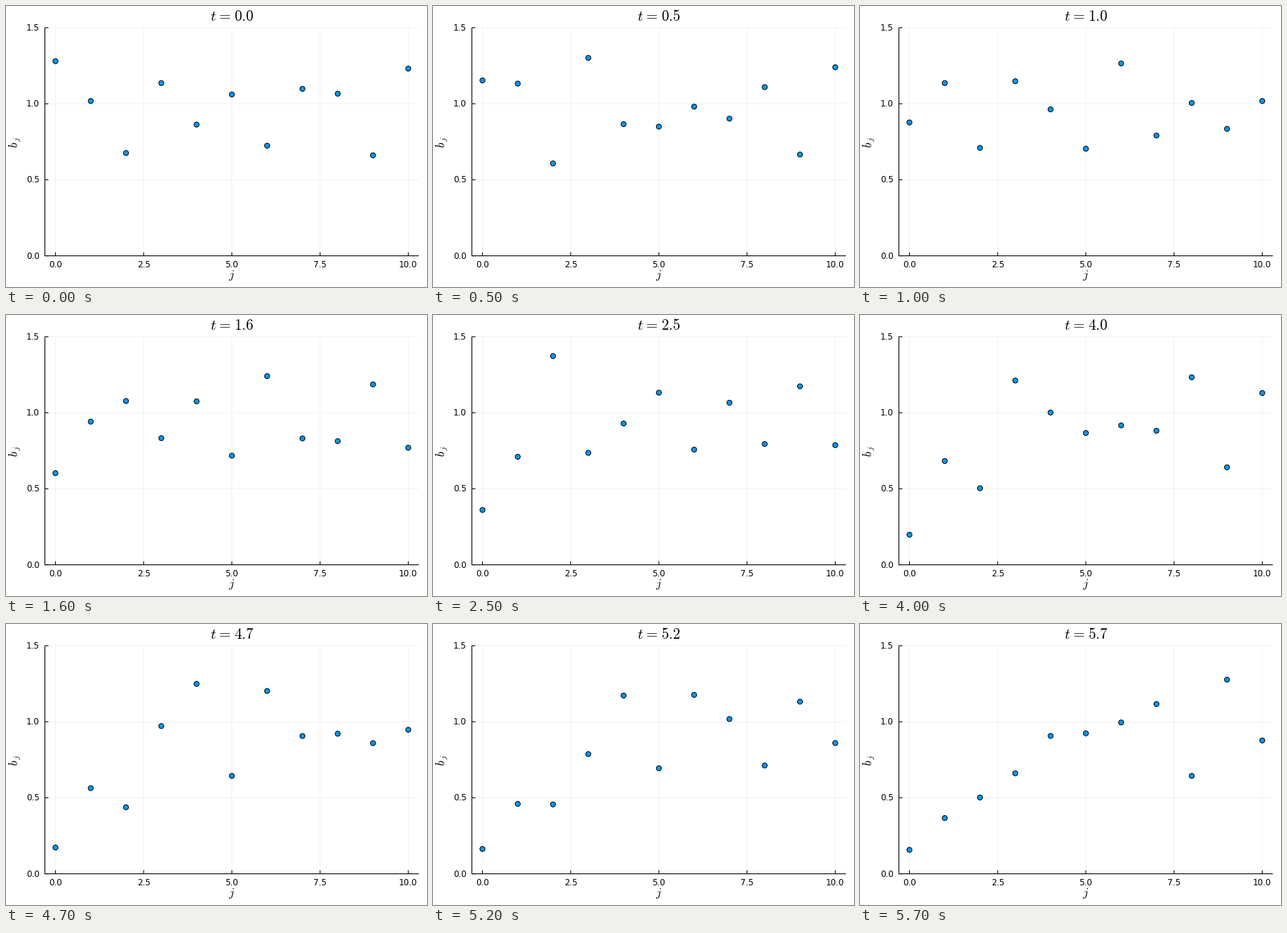
These frames come from a looping animation (600x400 px, 5.75 s). A matplotlib script:

```python
import numpy as np
import matplotlib.pyplot as plt
from matplotlib.animation import FuncAnimation
from matplotlib.patches import Circle

plt.rcParams["font.family"] = "DejaVu Sans"
plt.rcParams["mathtext.fontset"] = "cm"

W, H, DPI = 600, 400, 100
FRAMES, STEP_MS = 115, 50
DT = STEP_MS / 1000
PX = 72 / DPI
LEFT, RIGHT, TOP, BOTTOM = 55.4, 588.4, 30.9, 355.6

# Toda chain: b_0..b_9 at t = 0 and t = 1, and the curve driving b_10
START = [1.280, 1.018, .676, 1.136, .863, 1.061, .724, 1.098, 1.066, .661]
AT_ONE = [.877, 1.136, .710, 1.148, .963, .704, 1.265, .791, 1.005, .835]
EDGE_T = [0, .5, 1, 1.6, 2.5, 3.3, 4, 4.7, 5.2, 5.7]
EDGE_B = [1.231, 1.24, 1.018, .77, .787, 1.067, 1.13, .947, .86, .877]


def smooth(x, xs, ys):
    """Cubic Hermite curve through a few points."""
    xs, ys = np.array(xs), np.array(ys)
    slope = np.gradient(ys, xs)
    k = np.clip(np.searchsorted(xs, x) - 1, 0, len(xs) - 2)
    h = xs[k + 1] - xs[k]
    s = (x - xs[k]) / h
    ease = s * s * (3 - 2 * s)
    bend = h * s * (1 - s) * (slope[k] * (1 - s) - slope[k + 1] * s)
    return ys[k] + (ys[k + 1] - ys[k]) * ease + bend


edge = smooth(np.arange(FRAMES) * DT, EDGE_T, EDGE_B)


def accel(u, last):
    """(ln b_j)'' = (b_{j-1}^2 - 2 b_j^2 + b_{j+1}^2) / 2, free left end."""
    squares = np.concatenate([[0], np.exp(2 * u), [last ** 2]])
    return np.diff(squares, n=2) / 2


def evolve(v, steps):
    """Verlet path of b_0..b_10 from START with velocities v of ln b."""
    u = np.log(START)
    a = accel(u, edge[0])
    path = [np.append(np.exp(u), edge[0])]
    for last in edge[1:steps]:
        v = v + a * DT / 2
        u = u + v * DT
        a = accel(u, last)
        v = v + a * DT / 2
        path.append(np.append(np.exp(u), last))
    return np.array(path)


# Shoot for the velocities that reach AT_ONE
speed = np.zeros(len(START))
for _ in range(80):
    reached = evolve(speed, round(1 / DT) + 1)[-1, :-1]
    speed += np.log(AT_ONE) - np.log(reached)
path = evolve(speed, FRAMES)


def sx(x):
    return LEFT + (x + 0.3) * (RIGHT - LEFT) / 10.6


def sy(y):
    return BOTTOM - y * (BOTTOM - TOP) / 1.5


fig = plt.figure(figsize=(W / DPI, H / DPI), dpi=DPI, facecolor="white")
ax = fig.add_axes([0, 0, 1, 1])
ax.set(xlim=(0, W), ylim=(H, 0))
ax.axis("off")


def line(xs, ys, px=1.1, **style):
    ax.plot(xs, ys, color="black", lw=px * PX, snap=False,
            solid_capstyle="butt", **{"zorder": 2, **style})


def label(x, y, text, px, **style):
    return ax.text(x, y, text, fontsize=px * PX,
                   **{"ha": "center", "va": "baseline", **style})


grid = dict(px=0.7, alpha=0.08, zorder=1)
for x in np.arange(0, 10.1, 2.5):
    px = sx(x)
    line([px, px], [TOP, BOTTOM], **grid)
    line([px, px], [BOTTOM, BOTTOM - 5])
    label(px, 371.6, f"{x:.1f}", 12)
for y in np.arange(0, 1.6, 0.5):
    py = sy(y)
    line([LEFT, RIGHT], [py, py], **grid)
    line([LEFT, LEFT + 5], [py, py])
    label(47.5, py + 4.1, f"{y:.1f}", 12, ha="right")
line([LEFT, LEFT, RIGHT], [TOP, BOTTOM, BOTTOM])

title = label((LEFT + RIGHT) / 2, 20.8, "", 21)
label((LEFT + RIGHT) / 2, 388, "$j$", 17)
label(17, 193.8, r"$b_{\,j}$", 17, rotation=90, rotation_mode="anchor")

dots = [ax.add_patch(Circle((sx(j), sy(b)), 3.6, fc="#009af9", ec="black",
                            lw=PX, zorder=3))
        for j, b in enumerate(path[0])]


def update(i):
    for j, dot in enumerate(dots):
        dot.center = sx(j), sy(path[i, j])
    title.set_text(rf"$t\hspace{{0.08}}=\hspace{{0.08}}{round(i * DT, 2)}$")
    return [*dots, title]


anim = FuncAnimation(fig, update, frames=FRAMES, interval=STEP_MS,
                     init_func=lambda: update(0), repeat=True, repeat_delay=0)
plt.show()
```
